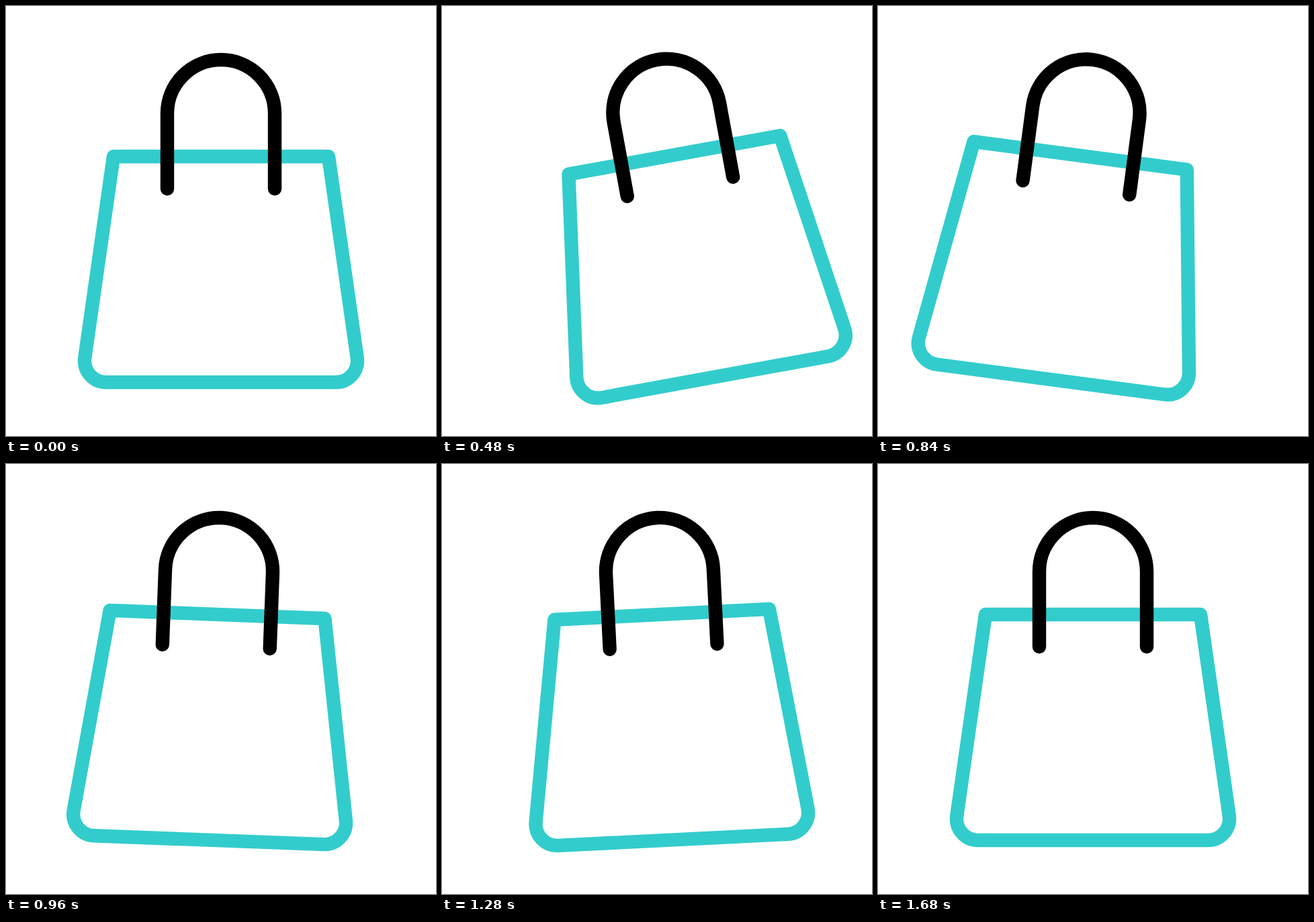
These frames come from a looping animation (640x640 px, 2 s). An HTML page:

```html
<!DOCTYPE html>
<html lang="en">
<head>
<meta charset="utf-8">
<title>Swinging bag</title>
<style>
  html, body { margin: 0; height: 100%; overflow: hidden; background: #fff; }
  svg { display: block; width: 100vw; height: 100vh; }
  path { fill: none; stroke-width: 20.4; stroke-linecap: round; stroke-linejoin: round; }
</style>
</head>
<body>
<svg viewBox="0 0 640 640">
  <g id="bag">
    <path stroke="#3cc" d="M160 224H480L522.7 523.5A32 32 0 0 1 491 560H149A32 32 0 0 1 117.3 523.5Z"/>
    <path stroke="#000" d="M240 272V160A80 80 0 0 1 400 160V272"/>
  </g>
</svg>
<script>
const LOOP = 2000, STEP = 40;
// [time in ms, angle in degrees]: a swing that dies away
const swing = [[0, 0], [80, 0], [440, -11], [800, 8], [1160, -6], [1440, 2], [1680, 0], [LOOP, 0]];
const bag = document.getElementById('bag');
const ease = p => p * p * (3 - 2 * p);

function angleAt(time) {
  const next = swing.findIndex(([end]) => time < end);
  const [start, from] = swing[next - 1];
  const [end, to] = swing[next];
  return from + (to - from) * ease((time - start) / (end - start));
}

function draw() {
  const time = Math.floor(performance.now() % LOOP / STEP) * STEP;
  bag.setAttribute('transform', `rotate(${angleAt(time)} 320 80)`);
  requestAnimationFrame(draw);
}
draw();
</script>
</body>
</html>
```
